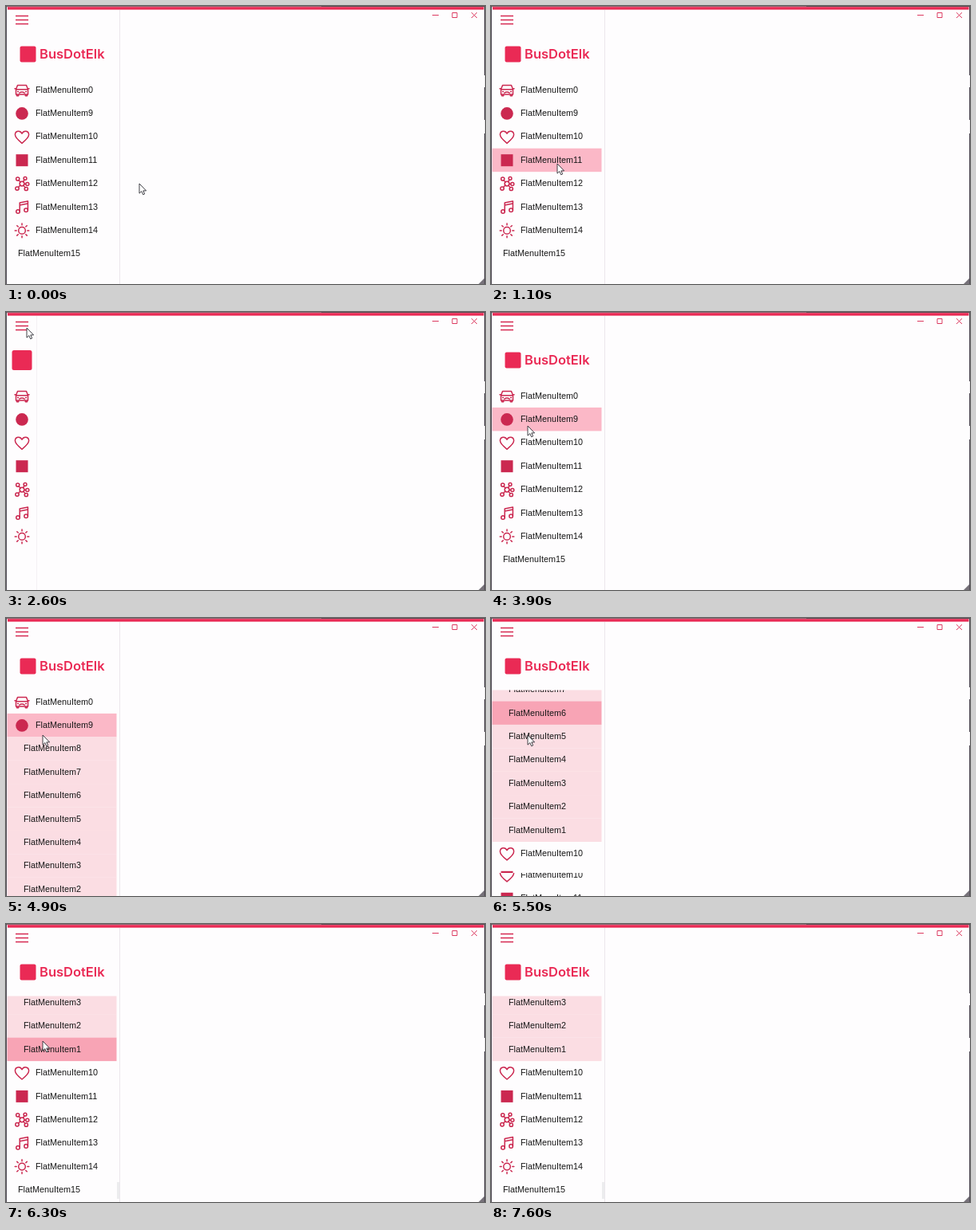
Animation of 600x349 px, one loop 7.7 s. Source, as an HTML page:

```html
<!DOCTYPE html>
<html lang="en">
<head>
<meta charset="utf-8">
<title>Flat menu</title>
<style>
  html, body { margin: 0; width: 100%; height: 100%; overflow: hidden; background: #fefdfe; }
  svg { display: block; width: 600px; height: 349px; }
  .line { fill: none; stroke: #cb2850; stroke-width: 1.5; stroke-linecap: round; stroke-linejoin: round; }
  .row { font: 10.8px "Liberation Sans", Arial, sans-serif; fill: #161616; }
  .brand { font: 600 16.5px Inter, sans-serif; fill: #ea2a55; }
</style>
</head>
<body>
<svg viewBox="0 0 600 349">
  <defs>
    <clipPath id="menuClip"><rect id="menuBox" x="1" y="5" width="142" height="344"/></clipPath>
    <clipPath id="listClip"><rect id="listBox" x="0" y="90.5" width="143" height="259"/></clipPath>
    <clipPath id="stripClip"><rect x="0" y="320" width="143" height="29"/></clipPath>

    <!-- icons are centred on 0,0 -->
    <g id="car" class="line">
      <path d="M-5.5-6H5.5L7.5-.8H-7.5ZM-7.5-.8V5.5H7.5V-.8M-9-1.8h1.2M9-1.8h-1.2M-6.5 5.8V7.2h2.2V5.8M6.5 5.8V7.2H4.3V5.8M-3.2 3.6Q0 1.4 3.2 3.6M-5.4 2h.8M5.4 2h-.8"/>
    </g>
    <circle id="chat" r="7.8" fill="#cb2850"/>
    <path id="heart" class="line" d="M0 8C-5 4-8.6.8-8.6-2.7C-8.6-7.8-2.2-8.8 0-4.2C2.2-8.8 8.6-7.8 8.6-2.7C8.6.8 5 4 0 8Z"/>
    <rect id="photo" x="-7.5" y="-7.5" width="15" height="15" fill="#cb2850"/>
    <g id="hub" class="line">
      <path d="M-2-2L-4-4.5M1.5-2.5L3-5M3 .4H4.6M2 2.3L4 4.8M-2.2 2L-4.4 4.3"/>
      <circle r="2.9"/><circle cx="-5.3" cy="-6" r="2.1"/><circle cx="4" cy="-6.6" r="1.9"/>
      <circle cx="6.8" cy=".4" r="2"/><circle cx="5.3" cy="6.4" r="2.1"/><circle cx="-6" cy="6" r="2.2"/>
    </g>
    <g id="music" class="line">
      <path d="M-2.8 5.5V-5.6L7.4-7.6V3.6M-2.8-2.4L7.4-4.4"/>
      <circle cx="-5" cy="5.5" r="2.3"/><circle cx="5.1" cy="3.7" r="2.3"/>
    </g>
    <g id="sun" class="line"><circle r="4.3"/><path id="rays"/></g>
  </defs>

  <rect width="600" height="349" fill="#fefdfe"/>

  <g clip-path="url(#menuClip)">
    <g id="wide">
      <rect x="17.5" y="50.5" width="20" height="20" rx="2" fill="#ea2a55"/>
      <text class="brand" x="42" y="66.3">BusDotElk</text>
    </g>
    <rect id="compact" x="7.5" y="48" width="25" height="25" rx="2.5" fill="#ea2a55"/>
    <g id="mainList" clip-path="url(#listClip)"></g>
    <g id="strip" clip-path="url(#stripClip)"><rect y="320" width="143" height="29" fill="#fefdfe"/></g>
    <rect id="thumb" x="139" y="324" width="4" height="21" fill="#ececee"/>
  </g>
  <path id="edge" d="M0 5V349" stroke="#ebe7ec"/>

  <path d="M12 12.5H28M12 17.5H28M12 22.5H28" stroke="#d62a52" stroke-width="1.6"/>
  <path d="M534 11.5H542M559 8.5H565V14.5H559ZM583 8.2L590 15M590 8.2L583 15" fill="none" stroke="#dc3a60"/>

  <rect width="600" height="1.2" fill="#8d6670"/>
  <rect x="395" width="205" height="1" fill="#5c4a50"/>
  <rect x="2" y="1.2" width="596.5" height="3.4" fill="#ea2a55"/>
  <path d="M.5 0V349M599.5 0V349" stroke="#55505a"/>
  <path d="M599.5 87V102M599.5 143V160" stroke="#f4f2f4"/>
  <path d="M599 342V349H592Z" fill="#77727a"/>

  <path id="cursor" d="M0 0V12.2L2.8 9.6L4.7 13.8L6.7 12.9L4.8 8.9H8.6Z" fill="#fff" stroke="#2b2b33" stroke-width=".9"/>
</svg>

<script>
const NS = "http://www.w3.org/2000/svg";
const $ = id => document.getElementById(id);
const LOOP = 7700, TOP = 90.5, ROW = 29.4, SUBS = 8;
const MAX = 212.5, LAG = 27, SCROLL_AT = 5213, SCROLL_RATE = 0.361;
const NUMBERS = [0, 9, 8, 7, 6, 5, 4, 3, 2, 1, 10, 11, 12, 13, 14, 15];
const ICONS = { 0: "car", 9: "chat", 10: "heart", 11: "photo", 12: "hub", 13: "music", 14: "sun" };

// time, x, y
const PATH = [
  [0, 167, 223], [300, 167, 223], [1000, 83, 198], [1400, 83, 198], [2000, 26, 20],
  [3200, 26, 20], [3800, 46, 143], [4100, 46, 143], [4300, 46, 147],
  [6800, 46, 147], [7200, -12, 160], [7700, -12, 160]
];

const clamp = v => Math.max(0, Math.min(1, v));
const ramp = (t, a, b) => clamp((t - a) / (b - a));
const ease = v => v * v * (3 - 2 * v);
const isSub = i => i > 1 && i < 2 + SUBS;
const show = (el, on) => el.setAttribute("visibility", on ? "inherit" : "hidden");

function add(parent, tag, attrs, text) {
  const el = document.createElementNS(NS, tag);
  for (const k in attrs) el.setAttribute(k, attrs[k]);
  if (text) el.textContent = text;
  return parent.appendChild(el);
}

function makeList(parent) {
  const root = add(parent, "g", {});
  const rows = NUMBERS.map((n, i) => {
    const g = add(root, "g", {});
    const back = add(g, "rect", { x: 1.5, width: 137, height: ROW + 0.1 });
    const icon = ICONS[n];
    if (icon) add(g, "use", { href: "#" + icon, x: 20, y: 15 });
    const x = isSub(i) ? 22 : icon ? 37 : 15;
    const label = add(g, "text", { class: "row", x, y: 18.2 }, "FlatMenuItem" + n);
    return { g, back, label };
  });
  return (offset, open, hover, labels) => rows.forEach(({ g, back, label }, i) => {
    const sub = isSub(i);
    const at = i < 2 + SUBS ? i : i - SUBS * (1 - open);
    g.setAttribute("transform", `translate(0 ${TOP + at * ROW - offset})`);
    show(g, !sub || i - 1 <= SUBS * open);
    show(label, labels);
    back.setAttribute("fill", sub ? (i === hover ? "#f8a4b5" : "#fbdde3")
                                  : (i === hover ? "#fbb8c7" : "none"));
  });
}

function pointer(t) {
  const k = PATH.findIndex((p, i) => i + 1 === PATH.length - 1 || t < PATH[i + 1][0]);
  const [a, ax, ay] = PATH[k], [b, bx, by] = PATH[k + 1];
  const e = ease(ramp(t, a, b));
  return [ax + (bx - ax) * e, ay + (by - ay) * e];
}

function rowAt(x, y, offset, open, width) {
  if (x < 1 || x > Math.min(139, width) || y < TOP) return -1;
  const i = Math.floor((y - TOP + offset) / ROW);
  return open === 0 && i > 1 ? i + SUBS : i;
}

let rays = "";
for (let i = 0; i < 8; i++) {
  const c = Math.cos(i * Math.PI / 4), s = Math.sin(i * Math.PI / 4);
  rays += `M${6.8 * c} ${6.8 * s}L${8.8 * c} ${8.8 * s}`;
}
$("rays").setAttribute("d", rays);

const drawMain = makeList($("mainList"));
const drawStrip = makeList($("strip"));

function draw(t) {
  const folded = ease(ramp(t, 2100, 2500)) - ease(ramp(t, 3000, 3400));
  const width = 142.5 - 104 * folded;
  const open = ramp(t, 4400, 4700);
  const offset = Math.max(0, Math.min(MAX, (t - SCROLL_AT) * SCROLL_RATE));
  const scrolling = offset > 0 && offset < MAX;
  const late = scrolling ? Math.max(0, offset - LAG) : offset;
  const [x, y] = pointer(t);
  const hover = rowAt(x, y, late, open, width);
  const full = width > 80;

  $("menuBox").setAttribute("width", width - 1);
  $("edge").setAttribute("transform", `translate(${width} 0)`);
  $("edge").setAttribute("opacity", 1 - 0.5 * folded);
  show($("wide"), full);
  show($("compact"), !full);
  show($("thumb"), offset === MAX);

  // the bottom strip repaints late while the list scrolls
  show($("strip"), scrolling);
  $("listBox").setAttribute("height", scrolling ? 229.5 : 258.5);
  drawMain(offset, open, hover, full);
  if (scrolling) drawStrip(late, open, hover, full);
  else $("strip").querySelectorAll("g").forEach(g => show(g, false));
  if (scrolling) show($("strip").querySelector("g"), true);

  $("cursor").setAttribute("transform", `translate(${x} ${y})`);
}

const start = performance.now();
function tick() {
  const t = (performance.now() - start) % LOOP;
  draw(Math.floor(t / 100) * 100);
  requestAnimationFrame(tick);
}
tick();
</script>
</body>
</html>
```
